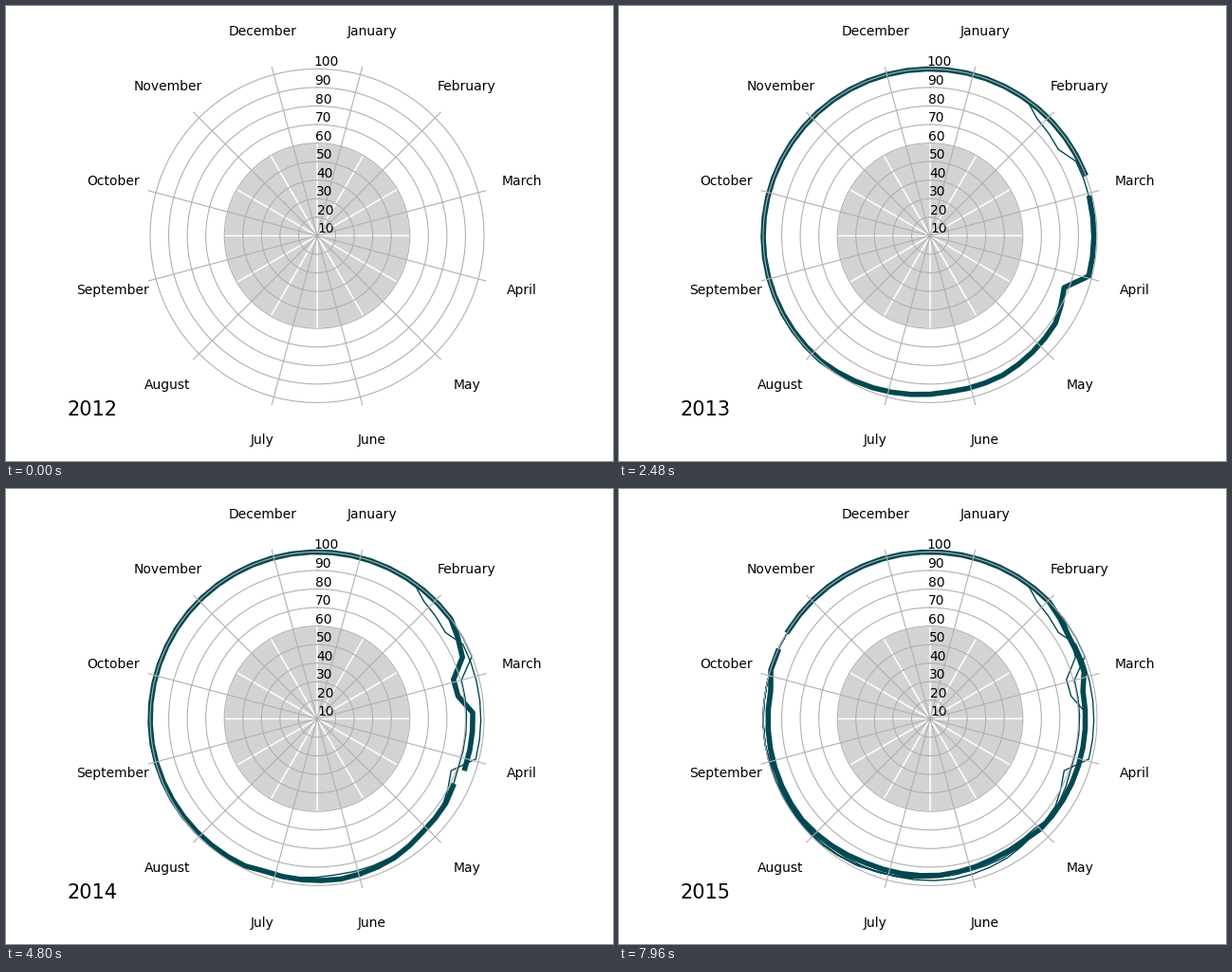
Write a matplotlib script that moves like this. It is 640 by 480 pixels and loops after 8 s.

```python
import numpy as np
import matplotlib.pyplot as plt
from matplotlib.animation import FuncAnimation

WEEKS = 200
WINDOW = 52
COLOR = "#004851"
MONTHS = ["January", "February", "March", "April", "May", "June", "July",
          "August", "September", "October", "November", "December"]
YEARS = np.arange(2012, 2016)
YEAR_DAYS = np.where(YEARS % 4 == 0, 366, 365)

# Turning points (week, level) of each year's fall in spring and slow refill.
TURNS = [
    (5, 100), (6, 95.6), (8, 93.4), (9, 98.3), (15, 98.3), (16, 87.5),
    (18, 92.4), (22, 94.8), (25, 94.8), (29, 97.6), (32, 99.6), (38, 100),

    (62, 100), (63, 90.6), (68, 90.6), (70, 93), (72, 93.5), (74, 95.8),
    (77, 97.4), (81, 97), (82, 98.4), (90, 100),

    (112, 100), (114, 95.1), (115, 86.5), (116, 87), (117, 94), (123, 94.1),
    (124, 91.7), (127, 92.5), (129, 95), (133, 97.4), (140, 97.9), (142, 100),

    (163, 100), (165, 97), (167, 96.8), (168, 93.7), (176, 94.1),
    (177, 92.9), (179, 92.9), (182, 94.6), (186, 95.2), (190, 98),
    (197, 97.3), (198, 99.8),
]

# One reading every Monday, starting on 2 January 2012.
week = np.arange(WEEKS)
day = 1 + 7 * week
year_start = np.cumsum(YEAR_DAYS) - YEAR_DAYS
index = np.searchsorted(year_start, day, side="right") - 1
theta = 2 * np.pi * (day - year_start[index]) / YEAR_DAYS[index]
level = np.interp(week, *zip(*TURNS))

fig = plt.figure(figsize=(6.4, 4.8), dpi=100)
ax = fig.add_subplot(projection="polar")
ax.set_theta_zero_location("N")
ax.set_theta_direction(-1)
ax.set_axisbelow(False)
ax.spines["polar"].set_visible(False)

mid = np.radians(np.arange(15, 360, 30))
ax.bar(mid, 50, width=np.radians(30), bottom=10,
       color="lightgray", edgecolor="white")
ax.set_xticks(mid, MONTHS)
ax.tick_params(axis="x", pad=17)
ax.set_yticks(range(10, 101, 10))
ax.set_rlim(10, 104.5)
ax.set_rlabel_position(-1)

history, = ax.plot([], [], color=COLOR, lw=1)
recent, = ax.plot([], [], color=COLOR, lw=4)
label = fig.text(0.1, 0.1, "2012", fontsize=15)


def update(now):
    """Draw all readings thin and the last year of them thick."""
    end = now + 1
    first = max(0, end - WINDOW)
    history.set_data(theta[:end], level[:end])
    recent.set_data(theta[first:end], level[first:end])
    label.set_text(str(YEARS[index[now]]))
    return history, recent, label


anim = FuncAnimation(fig, update, frames=WEEKS, interval=40,
                     repeat=True, repeat_delay=0)
plt.show()
```
